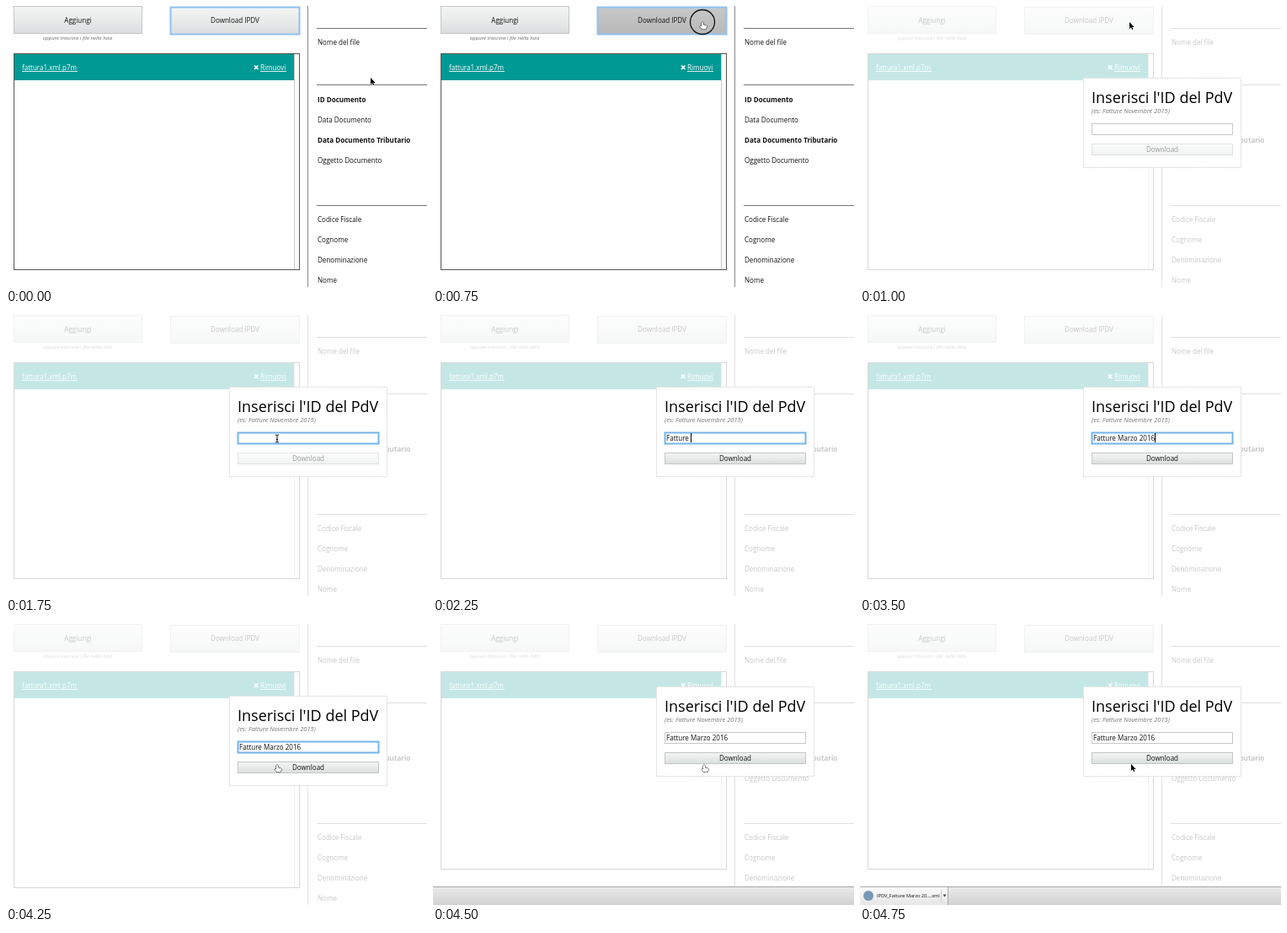
Animation, 500 px wide and 333 px high, one loop 5.75 s. Source, as an HTML page with a canvas:

```html
<!DOCTYPE html>
<html lang="it">
<head>
<meta charset="utf-8">
<style>
html, body { margin: 0; height: 100%; overflow: hidden; background: #fff; }
canvas { display: block; }
</style>
</head>
<body>
<canvas id="stage" width="500" height="333"></canvas>
<script>
const ctx = document.getElementById('stage').getContext('2d');
const LOOP = 5750, STEP = 250, LAST_STEP = 19;
const VALUE = 'Fatture Marzo 2016';
const TYPED = [1, 8, 8, 12, 14, 17, 18];   // characters shown from step 8 on
const POINTER = {
  0: ['arrow', 433, 85], 1: ['arrow', 405, 63], 2: ['arrow', 335, 24],
  3: ['hand', 321, 23], 4: ['arrow', 320, 19], 5: ['arrow', 325, 73],
  6: ['beam', 322, 146.5], 7: ['beam', 322, 146.5], 15: ['arrow', 322, 155],
  16: ['hand', 323, 171], 17: ['hand', 323, 171], 18: ['hand', 323, 171],
  19: ['arrow', 322, 166]
};
const SHAPES = {
  arrow: 'M0 0V8L1.9 6.3L3.1 9L4.4 8.4L3.2 5.9H5.7Z',
  hand: 'M-2-3.5Q-1-4.6 0-3.5V-.8L3.4 0Q4.3.4 4 2L3 4.6H-1.4L-4 1.2Q-3.8 0-2 1Z',
  beam: 'M-2-4.5Q0-4.5 0-3.5Q0-4.5 2-4.5M0-3.5V3.5M-2 4.5Q0 4.5 0 3.5Q0 4.5 2 4.5M-1 1H1'
};

function rect(x, y, w, h, color) {
  ctx.fillStyle = color;
  ctx.fillRect(x, y, w, h);
}

function frame(x, y, w, h, color, width = 1) {
  ctx.strokeStyle = color;
  ctx.lineWidth = width;
  ctx.strokeRect(x + .5, y + .5, w - 1, h - 1);
}

function text(s, x, y, { size = 8.05, color = '#111', style = '', align = 'left' } = {}) {
  ctx.font = `${style} ${size}px "Open Sans", sans-serif`;
  ctx.textAlign = align;
  ctx.fillStyle = color;
  ctx.fillText(s, x, y);
}

function shade(y, h, ...colors) {
  const g = ctx.createLinearGradient(0, y, 0, y + h);
  colors.forEach((c, i) => g.addColorStop(i / (colors.length - 1), c));
  return g;
}

function button(label, x, y, w, h, baseline, pressed) {
  const colors = pressed ? ['#c8c8c8', '#b8b8b8'] : ['#f4f5f5', '#e9ebeb', '#dadddd'];
  rect(x, y, w, h, shade(y, h, ...colors));
  frame(x, y, w, h, '#c4c6c6');
  text(label, x + w / 2, baseline, { align: 'center' });
}

function page(step, withBar) {
  rect(0, 0, 500, 333, '#fff');
  button('Aggiungi', 9, 0, 153, 33, 20, false);
  text('oppure trascina i file nella lista', 85, 39.5,
    { size: 6.1, style: 'italic', color: '#666', align: 'center' });
  button('Download IPDV', 195, 1, 154, 33, 20, step === 3);
  if (step < 4) frame(195, 1, 154, 33, '#8fc1ef', 2);

  const bottom = withBar ? 291 : 313;
  rect(342, 57, 1, bottom - 57, '#c8c8c8');
  rect(343, 57, 5, bottom - 57, '#fafafa');
  rect(10, 57, 332, 31, '#009994');
  frame(9, 56, 340, bottom - 56, '#555');
  text('fattura1.xml.p7m', 19, 75.5, { color: '#fff' });
  rect(19, 77, 66, 1, '#d4eeed');
  text('Rimuovi', 302, 75.5, { color: '#fff' });
  rect(302, 77, 31, 1, '#d4eeed');
  ctx.strokeStyle = '#fff';
  ctx.lineWidth = 1.8;
  ctx.stroke(new Path2D('M295 70.5L299.3 75M299.3 70.5L295 75'));

  rect(358, 0, 1, 333, '#888');
  for (const y of [26, 93, 236]) rect(369, y, 131, 1, '#777');
  const labels = [['Nome del file', 46], ['ID Documento', 114, 'bold'], ['Data Documento', 138],
    ['Data Documento Tributario', 162, 'bold'], ['Oggetto Documento', 186],
    ['Codice Fiscale', 256], ['Cognome', 280], ['Denominazione', 304], ['Nome', 328]];
  for (const [s, y, style] of labels) text(s, 370, y, { style });
}

function dialog(step, withBar) {
  ctx.save();
  if (withBar) ctx.translate(0, -11);
  rect(265, 85, 188, 107, '#fff');
  ctx.setLineDash([2, 1]);
  frame(265, 85, 188, 107, '#d8d8d8');
  ctx.setLineDash([]);
  text("Inserisci l'ID del PdV", 275, 114.5, { size: 18, color: '#000' });
  text('(es: Fatture Novembre 2015)', 275, 126.5, { size: 7.5, style: 'italic', color: '#777' });

  frame(275, 139, 168, 14, '#c8c8c8');
  if (step >= 6 && step < 18) frame(275, 139, 168, 14, '#74b4ec', 2);
  const value = step < 8 ? '' : VALUE.slice(0, TYPED[step - 8]);
  text(value, 277, 149);
  if (step === 6 || (step >= 8 && step < 16))
    rect(Math.round(277 + ctx.measureText(value).width), 140, 1, 11, '#000');

  ctx.globalAlpha = step < 8 ? .4 : 1;
  button('Download', 275, 163, 168, 14, 172.7, false);
  ctx.restore();
}

function downloadBar(withItem) {
  rect(0, 311, 500, 22, shade(311, 22, '#ebebeb', '#d2d2d2'));
  rect(0, 311, 500, 1, '#a8a8a8');
  if (!withItem) return;
  rect(0, 312, 104, 21, shade(312, 21, '#fbfbfb', '#e6e6e6'));
  rect(104, 312, 1, 21, '#aaa');
  rect(96, 315, 1, 15, '#ccc');
  ctx.fillStyle = '#7899b5';
  ctx.beginPath();
  ctx.arc(10, 322, 6, 0, 7);
  ctx.fill();
  text('IPDV_Fatture Marzo 20....xml', 20, 324, { size: 5.6 });
  ctx.fillStyle = '#444';
  ctx.fill(new Path2D('M98.5 320.5H102.5L100.5 323.5Z'));
}

function pointer([kind, x, y]) {
  const path = new Path2D(SHAPES[kind]);
  ctx.save();
  ctx.translate(x, y);
  ctx.lineJoin = 'round';
  ctx.lineWidth = 1;
  ctx.strokeStyle = kind === 'arrow' ? '#fff' : '#111';
  ctx.stroke(path);
  if (kind !== 'beam') {
    ctx.fillStyle = kind === 'arrow' ? '#000' : '#fff';
    ctx.fill(path);
  }
  ctx.restore();
}

function draw(now) {
  const step = Math.min(LAST_STEP, Math.floor(now % LOOP / STEP));
  const withBar = step >= 18;
  page(step, withBar);
  if (step >= 4) {
    rect(0, 0, 500, 333, 'rgba(255,255,255,.77)');
    dialog(step, withBar);
  }
  if (withBar) downloadBar(step === LAST_STEP);
  if (step === 3) {
    ctx.strokeStyle = '#111';
    ctx.lineWidth = 1.3;
    ctx.beginPath();
    ctx.arc(320, 19, 14.5, 0, 7);
    ctx.stroke();
  }
  if (POINTER[step]) pointer(POINTER[step]);
}

const start = performance.now();
function tick() {
  draw(performance.now() - start);
  requestAnimationFrame(tick);
}
tick();
</script>
</body>
</html>
```
